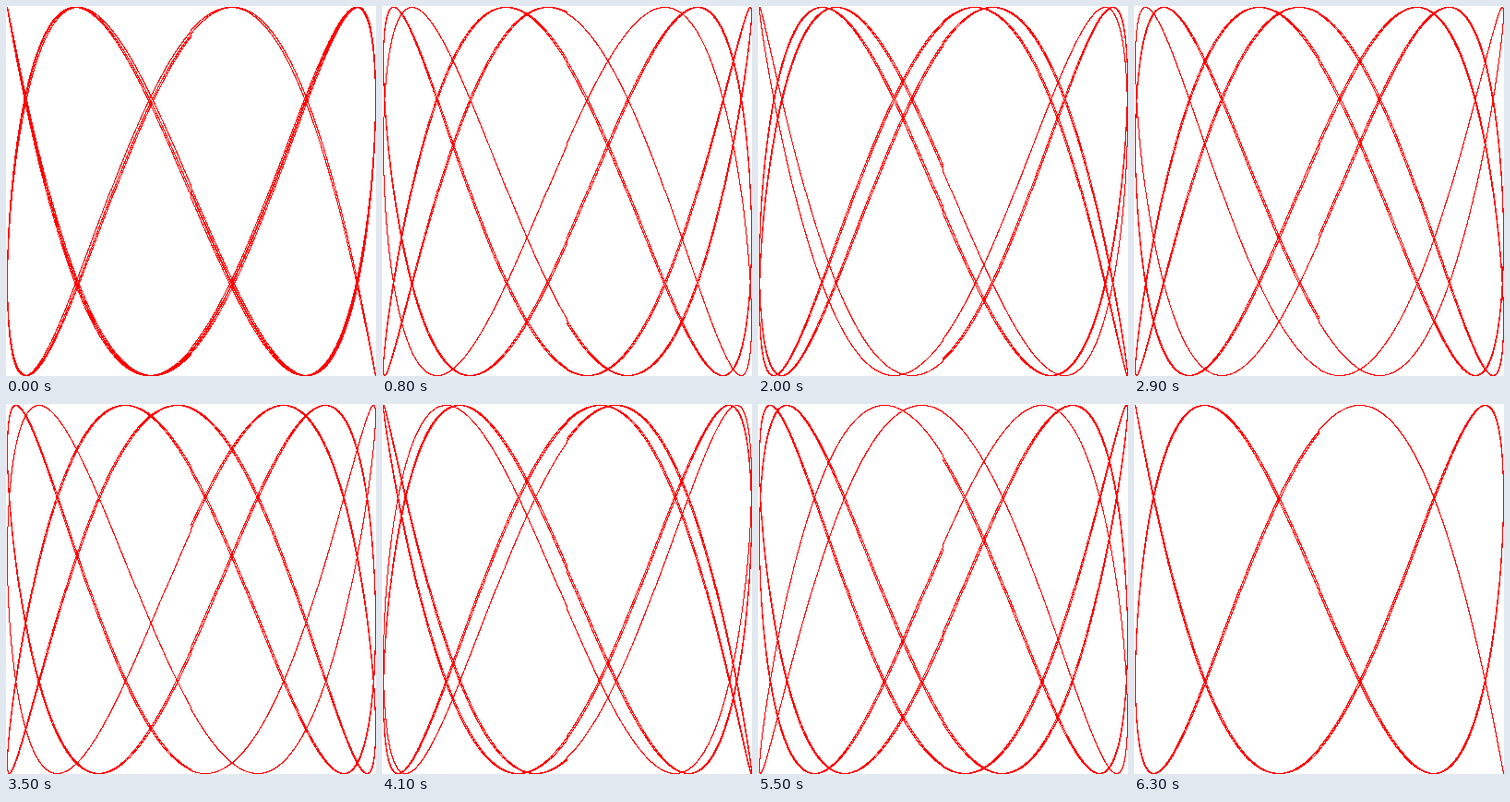
Animation, 401 px wide and 401 px high, one loop 6400 ms. Source, as an HTML page with a canvas:

```html
<!DOCTYPE html>
<html lang="en">
<head>
<meta charset="utf-8">
<title>Lissajous</title>
<style>
  html, body { margin: 0; width: 100%; height: 100%; overflow: hidden; background: #fff; }
  canvas { display: block; }
</style>
</head>
<body>
<canvas width="401" height="401"></canvas>
<script>
const SIZE = 200, SIDE = 2 * SIZE + 1;
const CYCLES = 5, STEP = 0.001, FREQ = 2.3321;
const STEPS = 64, STEP_MS = 100, PHASE_STEP = 0.1;
const WHITE = 0xffffffff, RED = 0xff0000ff; // ABGR

const ctx = document.querySelector('canvas').getContext('2d');
const image = ctx.createImageData(SIDE, SIDE);
const pixels = new Uint32Array(image.data.buffer);

// Truncating towards zero makes the centre row and column two units wide.
const toPixel = v => SIZE + Math.trunc(v * SIZE + 0.5);

function draw(phase) {
  pixels.fill(WHITE);
  for (let t = 0; t < CYCLES * 2 * Math.PI; t += STEP) {
    const x = toPixel(Math.sin(t));
    const y = toPixel(Math.sin(t * FREQ + phase));
    pixels[y * SIDE + x] = RED;
  }
  ctx.putImageData(image, 0, 0);
}

const start = performance.now();
let shown = -1;

function tick() {
  const step = Math.floor((performance.now() - start) / STEP_MS) % STEPS;
  if (step !== shown) draw((shown = step) * PHASE_STEP);
  requestAnimationFrame(tick);
}
tick();
</script>
</body>
</html>
```
